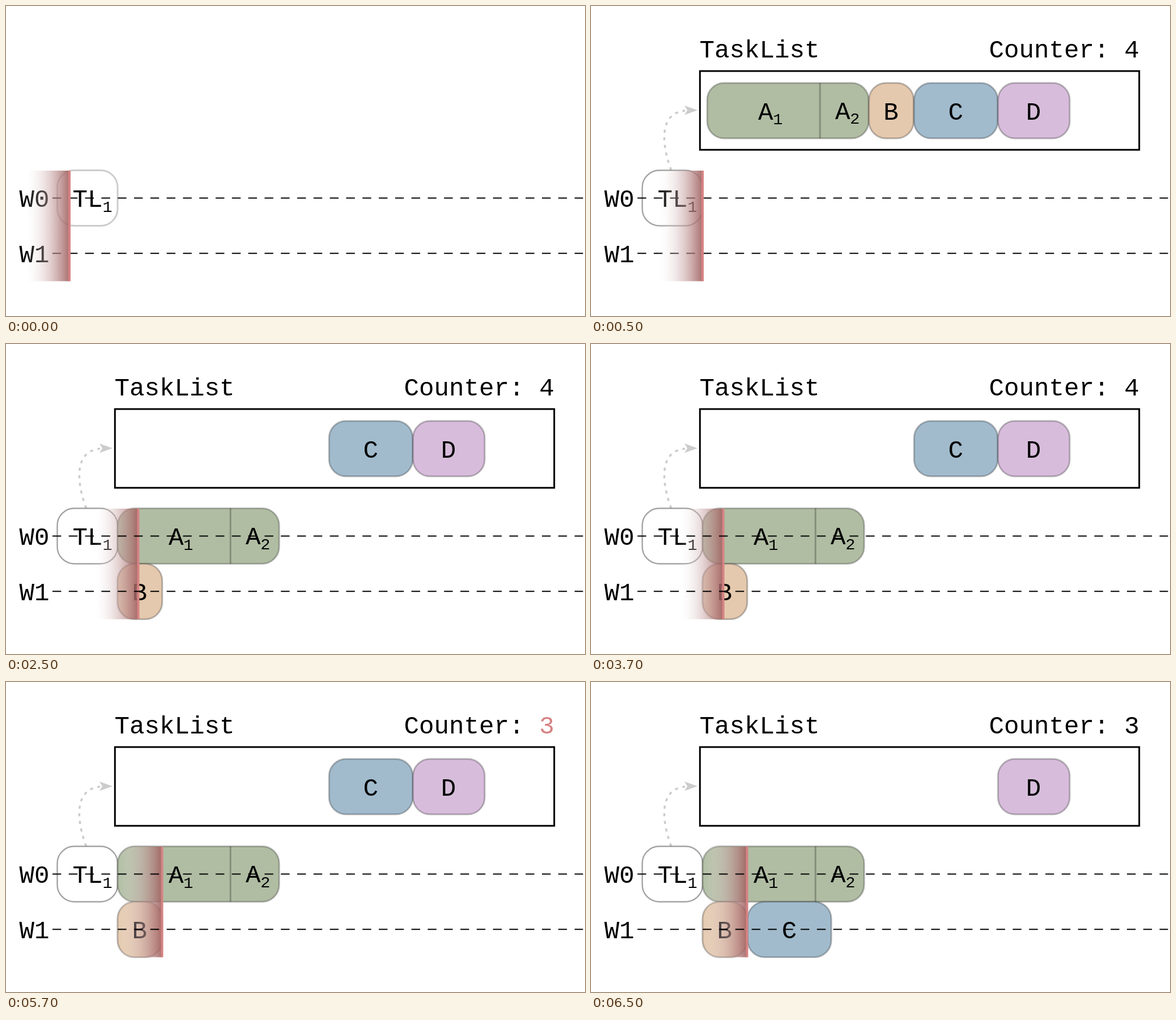
An HTML page for the animation above (8 s loop, 1022x548 px).

```html
<!DOCTYPE html>
<html lang="en">
<head>
<meta charset="utf-8">
<title>Task list scheduling</title>
<style>
  html, body { margin: 0; width: 100%; height: 100%; overflow: hidden; background: #fff; }
  svg { display: block; }
  text { font: 44.2px "Liberation Mono", "Noto Sans Mono", monospace; white-space: pre; }
  .sub { font-size: 28.5px; }
  .edge { stroke: #000; stroke-opacity: .25; stroke-width: 3; }
  .lane { stroke: #000; stroke-width: 2; stroke-dasharray: 15.4 13.4; }
</style>
</head>
<body>
<svg width="1022" height="548" viewBox="0 0 1022 548">
  <defs>
    <linearGradient id="trail">
      <stop offset="0" stop-color="#fff" stop-opacity="0"/>
      <stop offset="1" stop-color="#9f5e5e" stop-opacity=".9"/>
    </linearGradient>
  </defs>

  <g id="list">
    <text x="191.5" y="91">TaskList</text>
    <text x="702.5" y="91">Counter: <tspan id="count">4</tspan></text>
    <rect x="192.3" y="115" width="775.4" height="139.2" fill="none" stroke="#000" stroke-width="3"/>
    <path d="M141.5 290C128 255 115 190 166 185" fill="none" stroke="#ccc" stroke-width="3.5" stroke-dasharray="5.5 8"/>
    <path d="M188 184.3L165 176L170 184.3L165 192.6Z" fill="#ccc"/>
  </g>

  <text x="23.5" y="355">W0</text>
  <text x="23.5" y="453">W1</text>

  <rect id="loader" class="edge" x="90.5" y="290.5" width="106.5" height="98" rx="30" fill="#fff"/>
  <text x="117.5" y="355">TL<tspan class="sub" x="170.5" y="364">1</tspan></text>

  <g id="tasks"></g>

  <g id="lanes">
    <path class="lane" d="M82 339.5H1018.5"/>
    <path class="lane" d="M82 437.3H1018.5"/>
  </g>
  <g id="cursor">
    <rect x="-80" y="291" width="80" height="195.5" fill="url(#trail)"/>
    <rect x="-2" y="291" width="4" height="195.5" fill="#d68383"/>
  </g>
</svg>
<script>
const $ = id => document.getElementById(id);

const box = (x, w, fill) =>
  `<rect class="edge" x="${x}" y="136" width="${w}" height="98" rx="30" fill="${fill}"/>`;
const label = (x, y, name, sub = '') =>
  `<text x="${x}" y="${y}">${name}<tspan class="sub" x="${x + 26.3}" y="${y + 8.5}">${sub}</tspan></text>`;

// move: offset to the worker lane; from: time the task leaves the list
const tasks = [
  { move: [-8, 154.5], from: 2500,
    art: box(205, 285.2, '#b0bda3') + '<path class="edge" d="M404.2 136V234"/>' +
         label(295, 200.5, 'A', 1) + label(431, 199.5, 'A', 2) },
  { move: [-293.8, 252.5], from: 2500, art: box(490.6, 79, '#e4c9ae') + label(516.3, 200.5, 'B') },
  { move: [-293.8, 252.5], from: 6500, art: box(570.2, 147.8, '#a1bbcd') + label(630.5, 200.5, 'C') },
  { move: [0, 0], from: Infinity, art: box(718.4, 126.6, '#d7bddb') + label(767.8, 200.5, 'D') }
];
$('tasks').innerHTML = tasks.map(t => `<g>${t.art}</g>`).join('');

const stops = [[0, 112], [500, 197], [2500, 233.5], [4500, 275.5]];
const show = (el, on) => el.setAttribute('visibility', on ? 'visible' : 'hidden');

function draw(time) {
  const t = time % 8000, filled = t >= 500;
  show($('list'), filled);
  show($('tasks'), filled);
  $('loader').style.strokeOpacity = filled ? .36 : .2;
  $('loader').style.strokeWidth = filled ? 2.4 : 3;

  tasks.forEach(({ move, from }, i) =>
    $('tasks').children[i].setAttribute('transform', `translate(${t >= from ? move : [0, 0]})`));

  $('count').textContent = t < 4500 ? 4 : 3;
  $('count').setAttribute('fill', t >= 4500 && t < 6500 ? '#d68383' : '#000');

  const x = stops.filter(s => s[0] <= t).pop()[1];
  $('cursor').setAttribute('transform', `translate(${x})`);

  // the lanes pass above the cursor once workers run tasks
  const top = t < 2500 ? $('cursor') : $('lanes');
  if (top.nextElementSibling) top.parentNode.append(top);
}

const start = performance.now();
function tick() {
  draw(performance.now() - start);
  requestAnimationFrame(tick);
}
tick();
</script>
</body>
</html>
```
